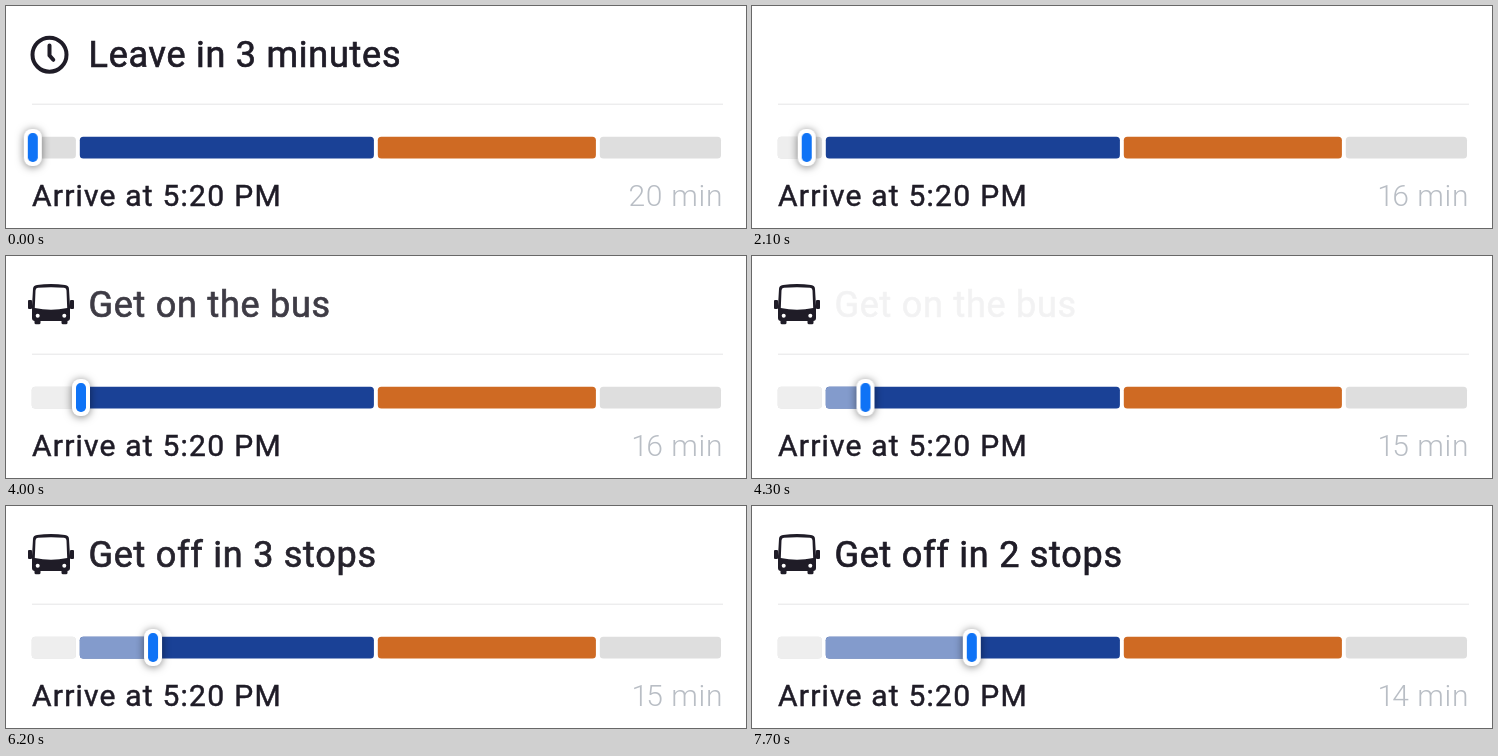
Animation, 740 px wide and 222 px high, one loop 8 s. Source, as an HTML page:

```html
<!DOCTYPE html>
<html lang="en">
<head>
<meta charset="utf-8">
<title>Trip progress</title>
<style>
html, body { margin: 0; width: 100%; height: 100%; overflow: hidden; background: #fff; }
svg { display: block; width: 740px; height: 222px; }
text { font-family: Roboto, Inter, sans-serif; font-weight: 400; fill: #1f1c27; white-space: pre; }
.title { font-size: 36px; letter-spacing: .75px; stroke: #1f1c27; stroke-width: .7px; }
.small { font-size: 30px; font-variant-numeric: proportional-nums; }
.arrive { letter-spacing: 1.2px; stroke: #1f1c27; stroke-width: .5px; }
.mins { letter-spacing: .6px; font-weight: 300; fill: #b9bec5; }
.ink { fill: #1f1c27; }
.line { fill: none; stroke: #1f1c27; stroke-width: 4; stroke-linecap: round; stroke-linejoin: round; }
#handle { filter: drop-shadow(0 1px 4px rgba(0, 0, 0, .5)); }
</style>
</head>
<body>
<svg viewBox="0 0 740 222">
  <defs>
    <clipPath id="past"><rect id="cover" y="120" width="740" height="44"/></clipPath>
  </defs>

  <g id="clock">
    <circle class="line" cx="43.5" cy="48.7" r="17"/>
    <path class="line" d="M43.5 39.5V49.5L47.3 53.8"/>
  </g>
  <g id="bus">
    <path class="ink" d="M27 33Q27 29.5 31 29Q45 27 59 29Q63 29.5 63 33L64 50V62Q64 65 61 65H29Q26 65 26 62V50Z"/>
    <path d="M29.5 34.5Q29.5 32 32 31.800Q45 30.800 58 31.800Q60.5 32 60.5 34.5L61.200 52Q45 55.500 28.800 52Z" fill="#fff"/>
    <rect class="ink" x="22" y="44" width="4" height="9" rx="1"/>
    <rect class="ink" x="64" y="44" width="4" height="9" rx="1"/>
    <rect class="ink" x="28.500" y="62" width="6" height="6.300" rx="1.500"/>
    <rect class="ink" x="55.500" y="62" width="6" height="6.300" rx="1.500"/>
    <circle cx="31.700" cy="59.700" r="2" fill="#fff"/>
    <circle cx="58.300" cy="59.700" r="2" fill="#fff"/>
  </g>
  <g id="titles"></g>

  <path d="M26 98.200H717" stroke="#e5e5e6" stroke-width="1"/>
  <g id="bar"></g>
  <g id="done" clip-path="url(#past)"></g>
  <g id="handle">
    <rect x="-9" y="123" width="18" height="37" rx="8" fill="#fff"/>
    <rect x="-5" y="127" width="10" height="29" rx="4.700" fill="#0f73f6"/>
  </g>

  <text class="small arrive" x="26" y="200">Arrive at 5:20 PM</text>
  <g id="minutes"></g>
</svg>
<script>
const LOOP = 8000, MOVE = 1100, OUT = 370, IN = 530, FADE = 300;
const starts = [1715, 3950, 6190];
const stops = [26.8, 72.8, 146.7, 219.8];
const titles = ['Leave in 3 minutes', 'Get on the bus', 'Get off in 3 stops', 'Get off in 2 stops'];
const minutes = [[0, 20], [1000, 16], [4050, 15], [6290, 14]];
const segments = [
  [25.7, 69.9, '#dedede', '#eeeeee'],
  [73.8, 367.9, '#1a4196', '#839bcc'],
  [371.8, 589.9, '#cf6a23', '#e7b491'],
  [593.8, 715, '#dedede', '#eeeeee']
];
const $ = id => document.getElementById(id);

function add(parent, tag, attrs, text = '') {
  const el = document.createElementNS('http://www.w3.org/2000/svg', tag);
  for (const key in attrs) el.setAttribute(key, attrs[key]);
  el.textContent = text;
  return $(parent).appendChild(el);
}

// steps: [time, value, easing towards the next step]
function play(el, prop, steps) {
  const all = [[0, steps[0][1]], ...steps, [LOOP, steps[steps.length - 1][1]]];
  el.animate(all.map(([t, value, easing = 'linear']) => ({ offset: t / LOOP, [prop]: value, easing })),
    { duration: LOOP, iterations: Infinity });
}

// Visible from transition "first" up to transition "last"
function fade(el, first, last) {
  const steps = [];
  if (first >= 0) {
    const t = starts[first] + IN;
    steps.push([t, 0], [t + FADE, 1]);
  }
  if (last < starts.length) steps.push([starts[last], 1], [starts[last] + OUT, 0]);
  play(el, 'opacity', steps);
}

for (const [x, end, color, pale] of segments) {
  const box = { x, y: 130.7, width: end - x, height: 21.7, rx: 3.5 };
  add('bar', 'rect', { ...box, fill: color });
  add('done', 'rect', { ...box, fill: pale });
}

titles.forEach((label, i) =>
  fade(add('titles', 'text', { class: 'title', x: 82.5, y: 60.5 }, label), i - 1, i));
fade($('clock'), -1, 0);
fade($('bus'), 0, starts.length);

minutes.forEach(([from, n], i) => {
  const el = add('minutes', 'text', { class: 'small mins', x: 717, y: 200, 'text-anchor': 'end' }, n + ' min');
  const until = i + 1 < minutes.length ? minutes[i + 1][0] : LOOP;
  play(el, 'opacity', [[0, from ? 0 : 1, 'step-end'], [from, 1, 'step-end'], [until, until < LOOP ? 0 : 1, 'step-end']]);
});

const travel = place => starts.flatMap((t, i) =>
  [[t, place(stops[i]), 'ease'], [t + MOVE, place(stops[i + 1])]]);
play($('handle'), 'transform', travel(x => `translateX(${x}px)`));
play($('cover'), 'transform', travel(x => `translateX(${x - 740}px)`));
</script>
</body>
</html>
```
